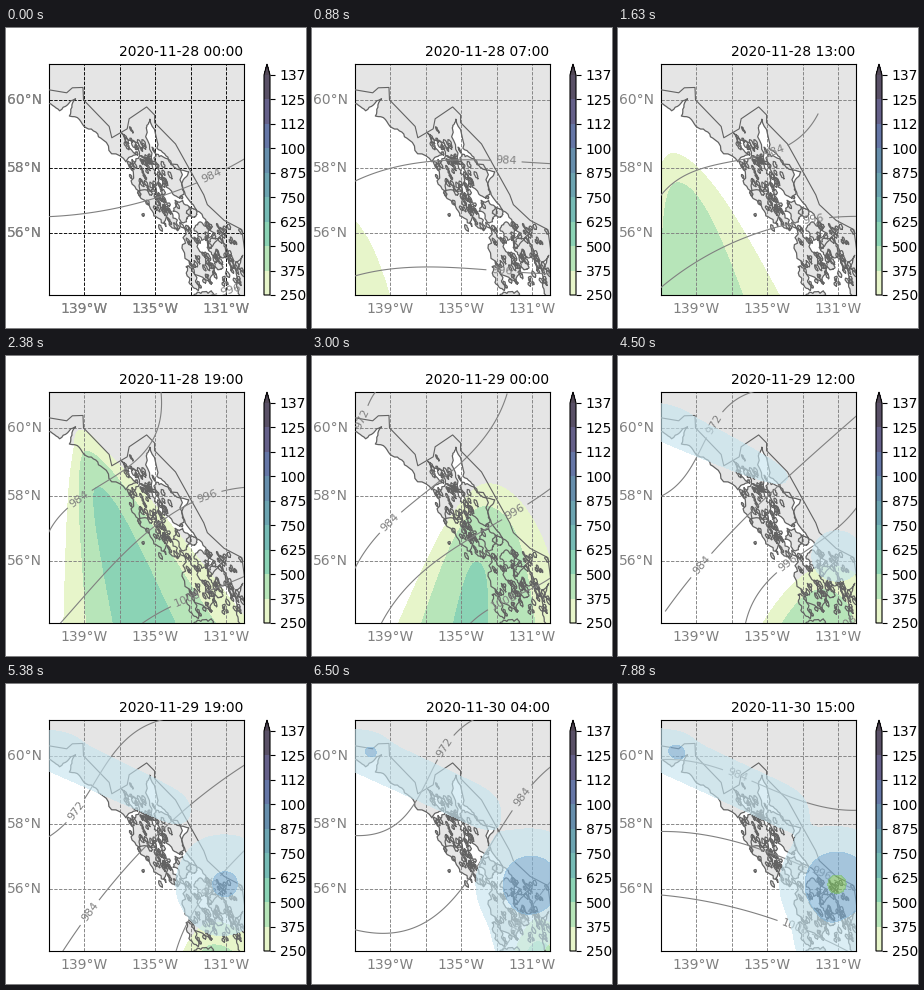
These frames come from a looping animation (300 by 300 pixels, 8 s). A matplotlib script:

```python
import numpy as np
import matplotlib.pyplot as plt
from matplotlib.animation import FuncAnimation
from matplotlib.cm import ScalarMappable
from matplotlib.colors import BoundaryNorm, LinearSegmentedColormap, ListedColormap

SIZE = 300
L, R, T, B = 43, 237.6, 36, 267
FRAMES, STEP = 64, 125
LAND, COAST = "#e5e5e5", "#626262"
rng = np.random.default_rng(11)

# degrees west, degrees north
MAINLAND = [
    (141.3, 59.9), (140.4, 59.69), (139.5, 60.03), (139.85, 59.54), (138.9, 59.2),
    (137.95, 58.85), (136.65, 58.2), (136.05, 58.42), (136.9, 59.05), (135.95, 58.75),
    (135.9, 58.4), (135.15, 58.2), (135.5, 59.2), (135.3, 59.45), (134.9, 58.6),
    (134.2, 58.2), (133.95, 58.05), (133.1, 57.9), (133.5, 57.55), (133.3, 57.2),
    (132.35, 56.6), (131.6, 56.0), (132.1, 55.85), (131.95, 55.5), (131.25, 55.95),
    (130.9, 55.3), (130.7, 54.8), (130.05, 55.3), (130.4, 54.35), (130.0, 53.8),
]
BORDER = [
    (141.2, 60.3), (140.0, 60.2), (139.68, 60.34), (139.08, 60.35), (139.05, 60.0),
    (137.6, 59.24), (137.45, 58.91), (136.58, 59.17), (136.47, 59.46), (135.48, 59.8),
    (135.03, 59.57), (135.03, 59.35), (133.85, 58.73), (132.25, 57.2), (132.05, 56.9),
    (131.1, 56.41), (130.1, 56.12), (129.9, 55.3),
]
# x, y, half length, half width
ISLANDS = [
    (138, 146, 19, 13), (148, 176, 25, 7), (162, 148, 25, 8), (165, 190, 16, 5),
    (177, 183, 12, 8), (186, 184, 5, 5), (195, 203, 10, 6), (190, 225, 30, 9),
    (186, 250, 13, 4), (211, 222, 11, 8), (213, 238, 5, 4), (195, 271, 8, 14),
]

# frame: (label position, points along the line)
ISOBARS = {
    "972": {
        19: (1, [(20, 40), (25, 30), (30, 25), (40, 15)]),
        29: (2, [(35, 130), (75, 97), (87, 63), (120, 34)]),
        43: (1, [(35, 157), (70, 127), (105, 73), (165, 34)]),
        52: (2, [(35, 151), (98, 126), (133, 63), (170, 32)]),
        63: (1, [(30, 30), (100, 28), (140, 20), (190, 10)]),
    },
    "984": {
        0: (2, [(30, 189), (120, 178), (206, 148), (245, 127)]),
        7: (2, [(30, 160), (105, 135), (194, 133), (245, 136)]),
        19: (1, [(35, 210), (73, 143), (118, 114), (155, 36)]),
        29: (1, [(40, 240), (83, 190), (165, 113), (235, 40)]),
        43: (1, [(55, 270), (84, 228), (150, 152), (245, 77)]),
        52: (2, [(30, 242), (120, 234), (210, 113), (245, 78)]),
        63: (1, [(30, 77), (119, 91), (190, 119), (245, 126)]),
    },
    "996": {
        0: (1, [(150, 290), (225, 262), (240, 257), (255, 250)]),
        7: (2, [(30, 252), (110, 239), (190, 243), (250, 246)]),
        19: (2, [(50, 272), (130, 186), (201, 140), (245, 131)]),
        29: (1, [(85, 270), (135, 212), (205, 172), (240, 128)]),
        43: (1, [(168, 275), (205, 203), (230, 175), (250, 155)]),
        52: (1, [(185, 275), (208, 240), (225, 215), (250, 185)]),
        63: (2, [(30, 148), (115, 157), (203, 190), (250, 212)]),
    },
    "1008": {
        7: (1, [(150, 300), (200, 305), (230, 310), (250, 315)]),
        19: (1, [(130, 272), (182, 243), (215, 230), (250, 215)]),
        29: (1, [(180, 270), (203, 247), (225, 235), (250, 210)]),
        43: (1, [(240, 300), (250, 290), (255, 285), (260, 280)]),
        52: (2, [(30, 290), (120, 305), (177, 323), (240, 350)]),
        63: (2, [(30, 210), (110, 222), (177, 243), (235, 270)]),
    },
}

# vapour plume by frame: centre, lean, width, growth, top, peak
PLUME = {
    0: (-20, 0, 40, 0.3, 230, 300),
    7: (20, 0, 62, 0.3, 165, 370),
    19: (132, 0.3, 84, 0.37, 78, 545),
    29: (178, -0.6, 77, 0.3, 180, 485),
    43: (208, 0, 44, 0.2, 240, 520),
    52: (226, 0, 32, 0.2, 237, 520),
    61: (245, 0, 30, 0.2, 250, 300),
}
# snow spots: x, y, spread, amount, onset frame
SNOW = [(36 + 136 * u, 62 + 63 * u, 22, 1.6, 18 + 12 * u) for u in np.linspace(0, 1, 7)]
SNOW += [(60, 65, 13, 1.5, 34), (219, 200, 44, 5.8, 33), (205, 265, 28, 2.2, 42)]


def merc(lat):
    return np.arcsinh(np.tan(np.radians(lat)))


def project(west, lat):
    x = L + (141 - np.asarray(west)) * (R - L) / 11
    y = T + (merc(61) - merc(lat)) / (merc(61) - merc(54)) * (B - T)
    return np.stack(np.broadcast_arrays(x, y), -1)


def rough(p, amp, depth=3):
    """Fractal midpoint displacement of a polyline."""
    for _ in range(depth):
        d = np.diff(p, axis=0)
        shift = rng.uniform(-amp, amp, (len(d), 1))
        mid = (p[:-1] + p[1:]) / 2 + shift * np.column_stack([-d[:, 1], d[:, 0]])
        p = np.insert(p, np.arange(1, len(p)), mid, axis=0)
    return p


def island(x, y, length, width, corners=11, amp=0.3, depth=2):
    """Ragged ellipse running from north-west to south-east."""
    a = np.linspace(0, 2 * np.pi, corners)
    r = rng.uniform(0.7, 1.2, corners)
    r[-1] = r[0]
    u, v, tilt = length * r * np.cos(a), width * r * np.sin(a), np.radians(62)
    ring = np.column_stack([x + u * np.cos(tilt) - v * np.sin(tilt),
                            y + u * np.sin(tilt) + v * np.cos(tilt)])
    return rough(ring, amp, depth)


def islet(x, y):
    return island(x, y, rng.uniform(1.5, 5), rng.uniform(0.7, 2), 7, 0.2, 1)


def pose(track, n):
    """Values of a keyed track at frame n, linear between keys."""
    keys = sorted(track)
    rows = np.array([track[k] for k in keys], float)
    flat = rows.reshape(len(keys), -1)
    return np.array([np.interp(n, keys, c) for c in flat.T]).reshape(rows.shape[1:])


def curve(pts, t):
    """Cubic through four points, by chord length."""
    s = np.append(0, np.cumsum(np.hypot(*np.diff(pts, axis=0).T)))
    s /= s[-1]
    fit = [np.poly1d(np.polyfit(s, c, 3)) for c in pts.T]
    return np.column_stack([f(t) for f in fit]), s


# ---- figure ----
fig = plt.figure(figsize=(SIZE / 100, SIZE / 100), dpi=100, facecolor="white")


def pixel_axes(left, right):
    return fig.add_axes([left / SIZE, 1 - B / SIZE, (right - left) / SIZE, (B - T) / SIZE])


ax = pixel_axes(L, R)
ax.set(xlim=(L, R), ylim=(B, T), xticks=[], yticks=[])
title = ax.set_title("", loc="right", fontsize=10)

deep = LinearSegmentedColormap.from_list("deep", [
    "#fdfdcc", "#ceecb3", "#9cdba5", "#6fc9a3", "#56b1a3", "#4c99a0",
    "#44829b", "#3e6c96", "#3e528f", "#403c73", "#362b4d", "#271a2c"])
levels = np.arange(250, 1376, 125)
tints = 0.2 + 0.8 * deep(np.append((np.arange(9) + 0.5) / 9, 1.0))[:, :3]
cmap = ListedColormap(tints[:9])
cmap.set_over(tints[9])
fig.colorbar(ScalarMappable(BoundaryNorm(levels, 9), cmap), cax=pixel_axes(258, 264),
             extend="max", ticks=levels)

# land
shore = rough(project(*np.transpose(MAINLAND)), 0.15)
lands = [np.vstack([shore, project([129, 129, 141.3], [53.8, 61.3, 61.3])])]
lands += [island(*spec) for spec in ISLANDS]
for _ in range(75):
    y = rng.uniform(197, 257)
    lands.append(islet(rng.uniform(165 + 0.4 * (y - 197), 237), y))
for _ in range(75):
    u = rng.uniform()
    lands.append(islet(130 + 32 * u + rng.normal(0, 8), 112 + 75 * u + rng.normal(0, 5)))
for p in lands:
    ax.fill(*p.T, fc=LAND, ec="none", zorder=1)
    ax.plot(*p.T, color=COAST, lw=0.9, zorder=3)
ax.plot(*project(*np.transpose(BORDER)).T, color=COAST, lw=0.8, zorder=3)

# graticule
grid = [ax.axvline(project(w, 60)[0]) for w in (139, 137, 135, 133, 131)]
grid += [ax.axhline(project(141, v)[1]) for v in (60, 58, 56)]
for g in grid:
    g.set(linestyle="--", linewidth=0.65, zorder=2.5)


def degree_labels():
    style = dict(color="gray", fontsize=10)
    out = [ax.text(project(w, 60)[0], 274, f"{w}°W", ha="center", va="top", **style)
           for w in (139, 135, 131)]
    return out + [ax.text(36, project(141, v)[1], f"{v}°N", ha="right", va="center", **style)
                  for v in (60, 58, 56)]


degree_labels()
doubled = degree_labels()

lines = {name: ax.plot([], [], color="gray", lw=0.8, zorder=4)[0] for name in ISOBARS}
tags = {name: ax.text(0, 0, name, color="gray", fontsize=8, ha="center", va="center",
                      clip_on=True, zorder=4) for name in ISOBARS}
X, Y = np.meshgrid(np.arange(L - 2, R + 4, 2), np.arange(T - 2, B + 4, 2))
fills = []


def vapour(n):
    centre, lean, width, growth, top, peak = pose(PLUME, n)
    d = X - centre - lean * (Y - B)
    w = np.maximum(width + growth * (Y - B), 18) * np.where(d > 0, 1.5, 1)
    return peak * np.exp(-(d / w) ** 2) / (1 + np.exp((top - Y) / 22))


def snow(n):
    total = np.zeros_like(X, float)
    for x, y, spread, amount, onset in SNOW:
        depth = amount * (1 - np.exp(-max(n - onset, 0) / 11))
        total += depth * np.exp(-((X - x) ** 2 + (Y - y) ** 2) / spread ** 2)
    return total


def shade(field, bounds, colors, z, alpha=1):
    if field.max() > bounds[0]:
        fills.append(ax.contourf(X, Y, field, bounds, colors=colors, zorder=z, alpha=alpha))


def draw_isobar(name, n):
    track = ISOBARS[name]
    pts = pose({k: v[1] for k, v in track.items()}, n)
    spot = track[min(track, key=lambda k: abs(k - n))][0]
    p, s = curve(pts, np.linspace(0, 1, 120))
    (a, mid, b), _ = curve(pts, s[spot] + np.array([-0.02, 0, 0.02]))
    angle = np.degrees(np.arctan2(a[1] - b[1], b[0] - a[0]))
    tags[name].set(position=mid, rotation=(angle + 90) % 180 - 90)
    p[np.hypot(*(p - mid).T) < 4 + 3.6 * len(name)] = np.nan
    lines[name].set_data(*p.T)


def update(n):
    title.set_text(f"2020-11-{28 + n // 24} {n % 24:02d}:00")
    for g in grid:
        g.set_color("black" if n == 0 else "gray")
    for t in doubled:
        t.set_visible(n == 0)
    while fills:
        fills.pop().remove()
    shade(vapour(n), levels[:4], tints[:3], 2)
    shade(snow(n), [1, 3.2, 5.2, 99], ["#c5e5f0", "#7fb2d8", "#7cc262"], 5, 0.62)
    for name in ISOBARS:
        draw_isobar(name, n)


anim = FuncAnimation(fig, update, frames=FRAMES, interval=STEP, repeat=True,
                     repeat_delay=0, init_func=lambda: update(0))
plt.show()
```
